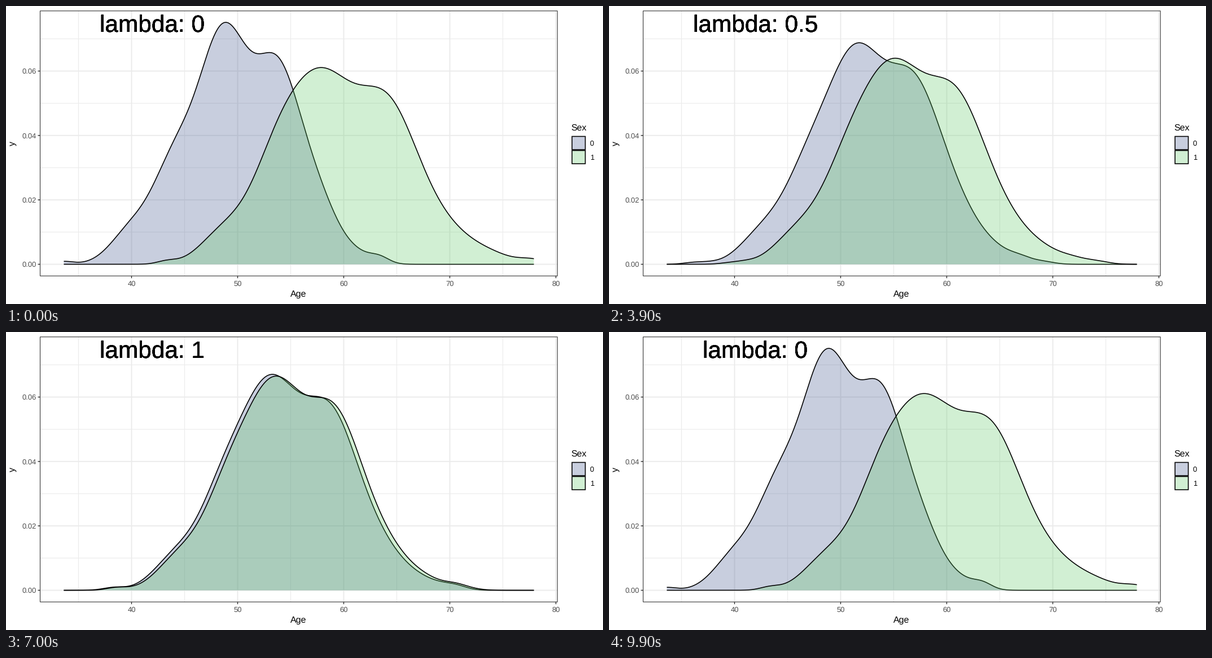
These frames come from a looping animation (1058 px wide and 529 px high, 10 s). A matplotlib script:

```python
import numpy as np
import matplotlib.pyplot as plt
from matplotlib.animation import FuncAnimation
from matplotlib.patches import Polygon, Rectangle

W, H, DPI = 1058, 529, 100
PX = 72 / DPI
BASE = 458
LEFT, RIGHT, TOP, BOTTOM = 60, 976.7, 8.2, 478.7
plt.rcParams["font.family"] = "Liberation Sans"
plt.rcParams["text.hinting"] = "none"

LAMBDAS = (0, 0.5, 0.8, 1)
MOVES = ((5, 25), (31, 50), (55, 74), (80, 99))  # first and last frame of each morph
COLORS = ("#3B528B", "#5DC863")
ALPHA = 0.28

# Bell curves that make up a density, in pixels:
# weight, centre in group 0 and 1, spread in group 0 and 1.
BELLS = (
    (85, 102, 284, 17, 17),
    (2010, 220, 382, 36, 40),
    (5700, 294, 472, 38, 46),
    (18580, 385, 559, 46, 60),
    (12240, 482, 676, 40, 52),
    (3800, 552, 765, 38, 60),
    (320, 628, 865, 28, 38),
    (160, 662, 932, 17, 22),
)
GRID_X = np.linspace(102, 935, 512)


def density(t):
    """Curve a share t of the way from group 0 to group 1."""
    total = np.zeros_like(GRID_X)
    for weight, x0, x1, s0, s1 in BELLS:
        centre, spread = x0 + t * (x1 - x0), s0 + t * (s1 - s0)
        total += weight / spread * np.exp(-((GRID_X - centre) / spread) ** 2 / 2)
    return total


STATES = [(density(v / 2), density(1 - v / 2)) for v in LAMBDAS]

fig = plt.figure(figsize=(W / DPI, H / DPI), dpi=DPI, facecolor="white")
ax = fig.add_axes([0, 0, 1, 1])
ax.set_xlim(-0.5, W - 0.5)
ax.set_ylim(H - 0.5, -0.5)
ax.axis("off")


def segment(x, y, color, width, z):
    ax.plot(x, y, color=color, lw=width * PX, zorder=z, snap=False,
            solid_capstyle="butt")


def write(x, y, text, size, color="black", ha="left", **kw):
    return ax.text(x, y, text, fontsize=size * PX, color=color, ha=ha,
                   va="baseline", zorder=6, **kw)


def outline(x, y, width, height, color, weight):
    ax.add_patch(Rectangle((x, y), width, height, fill=False, ec=color,
                           lw=weight * PX, zorder=5, snap=False))


def draw_axes():
    for age in range(35, 81, 5):
        major = age % 10 == 0
        x = 222 + (age - 40) * 18.8
        segment((x, x), (TOP, BOTTOM), "#EBEBEB", 1.9 if major else 1.1, 1)
        if major:
            segment((x, x), (BOTTOM, BOTTOM + 4), "#333333", 1.5, 5)
            write(x, 496, str(age), 13, "#4D4D4D", "center")
    for step in range(8):
        major = step % 2 == 0
        y = BASE - step * 343 / 6
        segment((LEFT, RIGHT), (y, y), "#EBEBEB", 1.9 if major else 1.1, 1)
        if major:
            segment((LEFT - 4, LEFT), (y, y), "#333333", 1.5, 5)
            write(53.7, y + 4.6, f"{step / 100:.2f}", 13, "#4D4D4D", "right")
    outline(LEFT, TOP, RIGHT - LEFT, BOTTOM - TOP, "#333333", 1.1)
    write(518, 515, "Age", 16, ha="center")
    write(15.5, 243.5, "y", 16, ha="center", rotation=90, rotation_mode="anchor")


def draw_legend():
    write(1001, 220.5, "Sex", 16)
    for i, color in enumerate(COLORS):
        top = 231 + 25 * i
        ax.add_patch(Rectangle((1002.6, top), 23.5, 23.5, fc=color, alpha=ALPHA, lw=0))
        outline(1002.6, top, 23.5, 23.5, "black", 1.6)
        write(1034.3, top + 16.5, str(i), 13)


draw_axes()
draw_legend()

fills, lines = [], []
for i, color in enumerate(COLORS):
    fill = Polygon([(0, 0), (1, 0), (1, 1)], fc=color, alpha=ALPHA, lw=0, zorder=2 + i)
    fills.append(ax.add_patch(fill))
    lines += ax.plot([], [], color="black", lw=1.6 * PX, zorder=2.5 + i,
                     solid_capstyle="butt")
# Stacked copies harden the edges of the big label.
labels = [write(259, 44.7, "", 42.4, ha="center") for _ in range(6)]


def progress(frame):
    for k, (start, end) in enumerate(MOVES):
        if frame < end:
            return k, max(0, (frame - start) / (end - start))
    return 0, 0


def draw(frame):
    k, p = progress(frame)
    following = (k + 1) % len(STATES)
    for fill, line, a, b in zip(fills, lines, STATES[k], STATES[following]):
        y = BASE - ((1 - p) * a + p * b)
        line.set_data(GRID_X, y)
        corners = [(GRID_X[-1], BASE), (GRID_X[0], BASE)]
        fill.set_xy(np.vstack([np.column_stack([GRID_X, y]), corners]))
    shown = LAMBDAS[k if p < 0.5 else following]
    for label in labels:
        label.set_text(f"lambda: {shown}")
    return fills + lines + labels


anim = FuncAnimation(fig, draw, frames=100, interval=100, repeat=True, repeat_delay=0)
plt.show()
```
